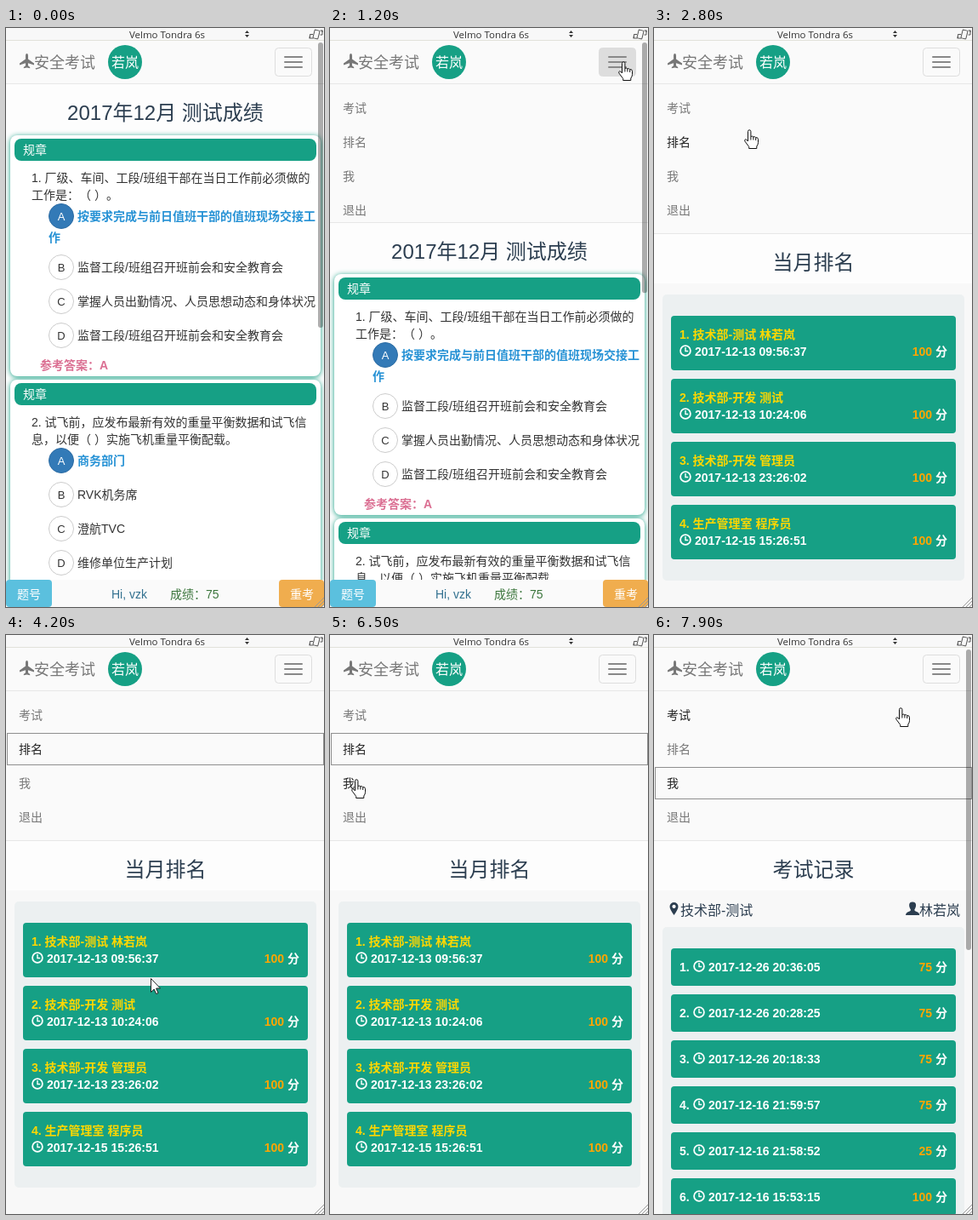
An HTML page that plays this animation: 374x680 px, repeating every 8 s.

```html
<!DOCTYPE html>
<html lang="zh-CN">
<head>
<meta charset="utf-8">
<title>安全考试</title>
<style>
html, body { margin: 0; width: 100%; height: 100%; overflow: hidden; background: #fdfdfd; }
svg { display: block; width: 374px; height: 680px; text-spacing-trim: space-all; }
text { font-family: "Liberation Sans", "Noto Sans CJK SC", "Noto Sans CJK", sans-serif; white-space: pre; }
.card { filter: drop-shadow(0 1px 3px #16a085); }
</style>
</head>
<body>
<svg id="stage" viewBox="0 0 374 680"></svg>
<script>
const LOOP = 8000, STEP = 100;
const TEAL = '#16a085', INK = '#2c3e50', MENU_H = 176;

// y is the middle of the line
function text(x, y, str, { size = 14, fill = '#333', bold, anchor = 'start', id, font } = {}) {
  return `<text x="${x}" y="${y + size * 0.36}" font-size="${size}" fill="${fill}" text-anchor="${anchor}"` +
    (bold ? ' font-weight="700"' : '') + (id ? ` id="${id}"` : '') +
    (font ? ` style="font-family:${font}"` : '') + `>${str}</text>`;
}
function box(x, y, w, h, fill, r = 0, extra = '') {
  return `<rect x="${x}" y="${y}" width="${w}" height="${h}" rx="${r}" fill="${fill}" ${extra}/>`;
}
function path(d, extra = '') {
  return `<path d="${d}" ${extra}/>`;
}
const group = (id, body, extra = '') => `<g id="${id}" ${extra}>${body}</g>`;

function option(y, letter, label, chosen) {
  return `<circle cx="65" cy="${y}" r="14.5" fill="${chosen ? '#337ab7' : '#fff'}" stroke="${chosen ? '#2e6da4' : '#ccc'}"/>` +
    text(65, y, letter, { size: 13, anchor: 'middle', fill: chosen ? '#fff' : '#333' }) +
    text(84, y, label, chosen ? { bold: true, fill: '#2792d5' } : {});
}
function card(y, h, body) {
  return box(5, y, 365, h, '#fff', 8, 'class="card"') + box(10, y + 4, 355, 26, TEAL, 8) +
    text(20, y + 17, '规章', { fill: '#fff' }) + body;
}
function title(str, y = 275) {
  return text(187.5, y, str, { size: 24, fill: INK, anchor: 'middle' });
}
function clock(x, y) {
  return `<circle cx="${x}" cy="${y}" r="5.9" fill="none" stroke="#fff" stroke-width="1.8"/>` +
    path(`M${x} ${y - 4}V${y + .5}H${x + 3.2}`, 'fill="none" stroke="#fff" stroke-width="1.4"');
}
function points(y, n) {
  return text(345, y, `<tspan fill="#ffa500">${n}</tspan> 分`, { bold: true, fill: '#fff', anchor: 'end' });
}

function scorePage() {
  const first = card(126, 283,
    text(30, 176, '1. 厂级、车间、工段/班组干部在当日工作前必须做的') +
    text(30, 196, '工作是：（ ）。') +
    option(221, 'A', '按要求完成与前日值班干部的值班现场交接工', true) +
    text(50, 246, '作', { bold: true, fill: '#2792d5' }) +
    option(281, 'B', '监督工段/班组召开班前会和安全教育会') +
    option(321, 'C', '掌握人员出勤情况、人员思想动态和身体状况') +
    option(361, 'D', '监督工段/班组召开班前会和安全教育会') +
    text(40, 396, '参考答案：A', { bold: true, fill: '#db7093' }));
  const second = card(413, 283,
    text(30, 463, '2. 试飞前，应发布最新有效的重量平衡数据和试飞信') +
    text(30, 483, '息，以便（ ）实施飞机重量平衡配载。') +
    option(508, 'A', '商务部门', true) +
    option(548, 'B', 'RVK机务席') +
    option(588, 'C', '澄航TVC') +
    option(628, 'D', '维修单位生产计划'));
  return title('2017年12月 测试成绩', 99) + first + second;
}

function footer() {
  return box(0, 648, 374, 32, '#fafafa') + box(0, 648, 54, 32, '#5bc0de', 4) + box(321, 648, 53, 32, '#f0ad4e', 4) +
    text(27, 665, '题号', { fill: '#fff', anchor: 'middle' }) +
    text(348, 665, '重考', { fill: '#fff', anchor: 'middle' }) +
    text(124, 665, 'Hi, vzk', { fill: '#31708f' }) +
    text(193, 665, '成绩：75', { fill: '#3c763d' });
}

function rankList() {
  const rows = [
    ['技术部-测试 林若岚', '13 09:56:37'], ['技术部-开发 测试', '13 10:24:06'],
    ['技术部-开发 管理员', '13 23:26:02'], ['生产管理室 程序员', '15 15:26:51']];
  return box(10, 313, 355, 336, '#ecf0f1', 5) + rows.map(([who, when], i) => {
    const y = 338 + 74 * i;
    return box(20, y, 335, 64, TEAL, 4) +
      text(30, y + 22, `${i + 1}. ${who}`, { bold: true, fill: '#ffd700' }) + clock(37, y + 41) +
      text(48, y + 42, '2017-12-' + when, { bold: true, fill: '#fff' }) + points(y + 42, 100);
  }).join('');
}

function recordList() {
  const rows = [
    ['26 20:36:05', 75], ['26 20:28:25', 75], ['26 20:18:33', 75],
    ['16 21:59:57', 75], ['16 21:58:52', 25], ['16 15:53:15', 100]];
  return path('M23.5 329q-5-7-5-10a5 5 0 0 1 10 0q0 3-5 10ZM23.5 316.8a2.1 2.1 0 1 0 .01 0Z', `fill="${INK}" fill-rule="evenodd"`) +
    text(31, 323, '技术部-测试', { size: 16, fill: INK }) +
    path('M304 313.500c5 0 5 5 2.300 9.200q0 1.300 2 2q4 1.300 4 4.300H296q0-3 4-4.300q2-.7 2-2c-2.700-4.200-2.700-9.200 2-9.200Z', `fill="${INK}"`) +
    text(312, 323, '林若岚', { size: 16, fill: INK }) +
    box(10, 343, 355, 345, '#ecf0f1', 5) + rows.map(([when, n], i) => {
      const y = 368 + 54 * i;
      return box(20, y, 335, 44, TEAL, 4) + text(30, y + 22, `${i + 1}.`, { bold: true, fill: '#fff' }) +
        clock(53, y + 21) + text(64, y + 22, '2017-12-' + when, { bold: true, fill: '#fff' }) + points(y + 22, n);
    }).join('');
}

function spinner() {
  let dots = '';
  for (let k = 0; k < 8; k++) {
    const a = k * Math.PI / 4;
    dots += `<circle cx="${188 + 20 * Math.sin(a)}" cy="${363 - 20 * Math.cos(a)}" r="5" fill="#3498db"/>`;
  }
  return dots;
}

function titleBar() {
  return box(0, 0, 374, 14, '#f8f8f8') + box(0, 14, 374, 1, '#e2e2da') +
    text(189.5, 8, 'Velmo Tondra 6s', { size: 11.5, anchor: 'middle', font: "'Open Sans',sans-serif" }) +
    path('M281 6L283.500 3L286 6ZM281 8L283.500 11L286 8Z', 'fill="#333"') +
    `<g fill="none" stroke="#555">` +
    box(362, 2.5, 6, 10, 'none', 1, 'transform="rotate(14 365 7.5)"') +
    path('M361 7.5h-3.500v4.500h4M357 10v2.500M369.500 3h2.500v5h-2.500M372 5v-2.500') + '</g>';
}

function navBar() {
  const bars = [33, 39, 45].map(y => box(327, y, 22, 2, '#888', 1)).join('');
  return path('M24.500 30q1.500 0 1.500 3v3.500l7 5v2l-7-2.200v3l2.200 1.700v1.300l-3.700-.8l-3.700 .8v-1.300l2.200-1.700v-3l-7 2.200v-2l7-5V33q0-3 1.500-3Z', 'fill="#777"') +
    text(33, 41, '安全考试', { size: 18, fill: '#777' }) +
    `<circle cx="140" cy="40" r="20" fill="${TEAL}"/>` +
    text(140, 40, '若岚', { size: 16, fill: '#fff', anchor: 'middle' }) +
    box(316.5, 23.5, 43, 33, 'none', 4, 'id="toggle" stroke="#ddd"') + bars;
}

const items = ['考试', '排名', '我', '退出'];
const stage = document.getElementById('stage');
stage.innerHTML =
  '<clipPath id="menuClip"><rect id="menuArea" x="0" y="15" width="374"/></clipPath>' +
  box(0, 0, 374, 680, '#fdfdfd') +
  group('score', scorePage()) + group('footer', footer()) +
  group('plain', box(0, 300, 374, 380, '#f8f8f8')) +
  group('rankTitle', title('当月排名')) + group('recordTitle', title('考试记录')) +
  group('spinner', spinner()) + group('rank', rankList()) + group('record', recordList()) +
  box(0, 15, 374, 51, '#fafafa', 0, 'id="navBg"') +
  group('menu', items.map((s, i) => text(15, 94 + 40 * i, s, { id: 'item' + i })).join(''), 'clip-path="url(#menuClip)"') +
  box(0, 65, 374, 1, '#e7e7e7') + box(0, 65, 374, 1, '#e7e7e7', 0, 'id="navEdge"') +
  box(1.5, 0, 372, 37, 'none', 0, 'id="focus" stroke="#222" stroke-dasharray="1 1"') +
  navBar() + titleBar() +
  box(367, 17, 6, 0, '#000', 3, 'id="thumb" fill-opacity=".32"') +
  path('M363 680L374 669M367 680L374 673M371 680L374 677', 'stroke="#999"') +
  group('hand', path('M4.500 13V2.500a1.700 1.700 0 0 1 3.400 0V8.500q1.600-1 3 .4q1.700-.8 2.800 .7q2.600-.4 2.800 2V15.500q0 2.500-1.700 4.500V22.500H5.700V20.500L1 14.200q-1-2 .6-2.400q1.300-.2 2.900 2.200ZM7.900 8.500v4M10.900 9v3.500M13.700 10v3'), 'fill="#fff" stroke="#111"') +
  group('arrow', path('M.5 .5V16.500L4.200 13L6.700 18.500L9 17.500L6.600 12H11.500Z'), 'fill="#fff" stroke="#222"');

const el = {};
stage.querySelectorAll('[id]').forEach(n => el[n.id] = n);
const dots = [...el.spinner.children];

// pointer tip: time, x, y
const track = [
  [300, 361, 36], [400, 349, 38], [500, 345, 38], [900, 345, 38], [1000, 345, 39], [1300, 345, 39],
  [1500, 285, 56], [1800, 116, 119], [1900, 112, 119], [3100, 112, 119], [3300, 122, 150], [3600, 140, 265],
  [4000, 150, 368], [4300, 180, 420], [4500, 191, 480], [4700, 160, 545], [4900, 142, 571], [5100, 144, 594],
  [5200, 144, 594], [5400, 160, 480], [5500, 169, 410], [5600, 162, 341], [5800, 138, 275], [6100, 85, 210],
  [6500, 31, 169], [7500, 31, 169], [7600, 60, 160], [7700, 140, 132], [7800, 235, 102], [7900, 290, 85]];

function pointer(t) {
  if (t < track[0][0]) return null;
  const i = track.findIndex(k => k[0] >= t);
  if (i < 1) return track[i < 0 ? track.length - 1 : 0].slice(1);
  const [a, b] = [track[i - 1], track[i]];
  const f = (t - a[0]) / (b[0] - a[0]);
  return [1, 2].map(k => Math.round(a[k] + (b[k] - a[k]) * f));
}

// CSS "ease": cubic-bezier(.25, .1, .25, 1)
function ease(x) {
  if (x <= 0) return 0;
  if (x >= 1) return 1;
  const curve = (u, p, q) => 3 * u * (1 - u) ** 2 * p + 3 * u * u * (1 - u) * q + u ** 3;
  let lo = 0, hi = 1;
  for (let i = 0; i < 24; i++) {
    const mid = (lo + hi) / 2;
    if (curve(mid, .25, .25) < x) lo = mid; else hi = mid;
  }
  return curve(lo, .1, 1);
}

const set = (n, attrs) => { for (const k in attrs) n.setAttribute(k, attrs[k]); };
const show = (n, on) => n.style.display = on ? '' : 'none';

function render(t) {
  const onScore = t < 2600, onRank = !onScore && t < 7000, onRecord = t >= 7000;
  const loadStart = onRank ? 2600 : 7000;
  const loading = !onScore && t < (onRank ? 2800 : 7300);
  const open = ease((t - 967) / 350), drop = Math.round(MENU_H * open);

  show(el.score, onScore);
  show(el.footer, onScore);
  show(el.plain, !onScore);
  show(el.rankTitle, onRank);
  show(el.recordTitle, onRecord);
  show(el.spinner, loading);
  show(el.rank, onRank && !loading);
  show(el.record, onRecord && !loading);
  set(el.score, { transform: `translate(0 ${drop})` });
  set(el.navBg, { height: 51 + drop });
  set(el.menuArea, { height: 51 + drop });
  set(el.navEdge, { y: 65 + drop });

  dots.forEach((d, k) => {
    const f = Math.min(1, Math.max(0, (t - loadStart - 120 * k) / 500));
    set(d, { r: 5 - 3 * f, opacity: 1 - .7 * f });
  });

  const thumbEnd = onScore ? 352 - 44 * open : 370;
  show(el.thumb, onScore || (onRecord && !loading));
  set(el.thumb, { height: thumbEnd - 17 });

  const tip = pointer(t);
  const [x, y] = tip || [-99, -99];
  const overToggle = x >= 316 && x < 360 && y >= 23 && y < 57;
  const row = Math.floor((y - 74) / 40);
  const hover = open === 1 && row >= 0 && row < items.length ? row : -1;
  const focus = onScore ? -1 : onRank ? 1 : 2;
  items.forEach((_, i) => set(el['item' + i], { fill: i === hover || i === focus ? '#222' : '#777' }));
  show(el.focus, focus >= 0 && focus !== hover);
  set(el.focus, { y: 75.5 + 40 * focus });
  set(el.toggle, { fill: overToggle || (t >= 1000 && onScore) ? '#ddd' : 'none' });

  const isHand = overToggle || hover >= 0;
  show(el.hand, tip && isHand);
  show(el.arrow, tip && !isHand);
  set(el.hand, { transform: `translate(${x - 6} ${y})` });
  set(el.arrow, { transform: `translate(${x} ${y})` });
}

const start = performance.now();
function tick() {
  const t = (performance.now() - start) % LOOP;
  render(Math.floor(t / STEP) * STEP);
  requestAnimationFrame(tick);
}
tick();
</script>
</body>
</html>
```
